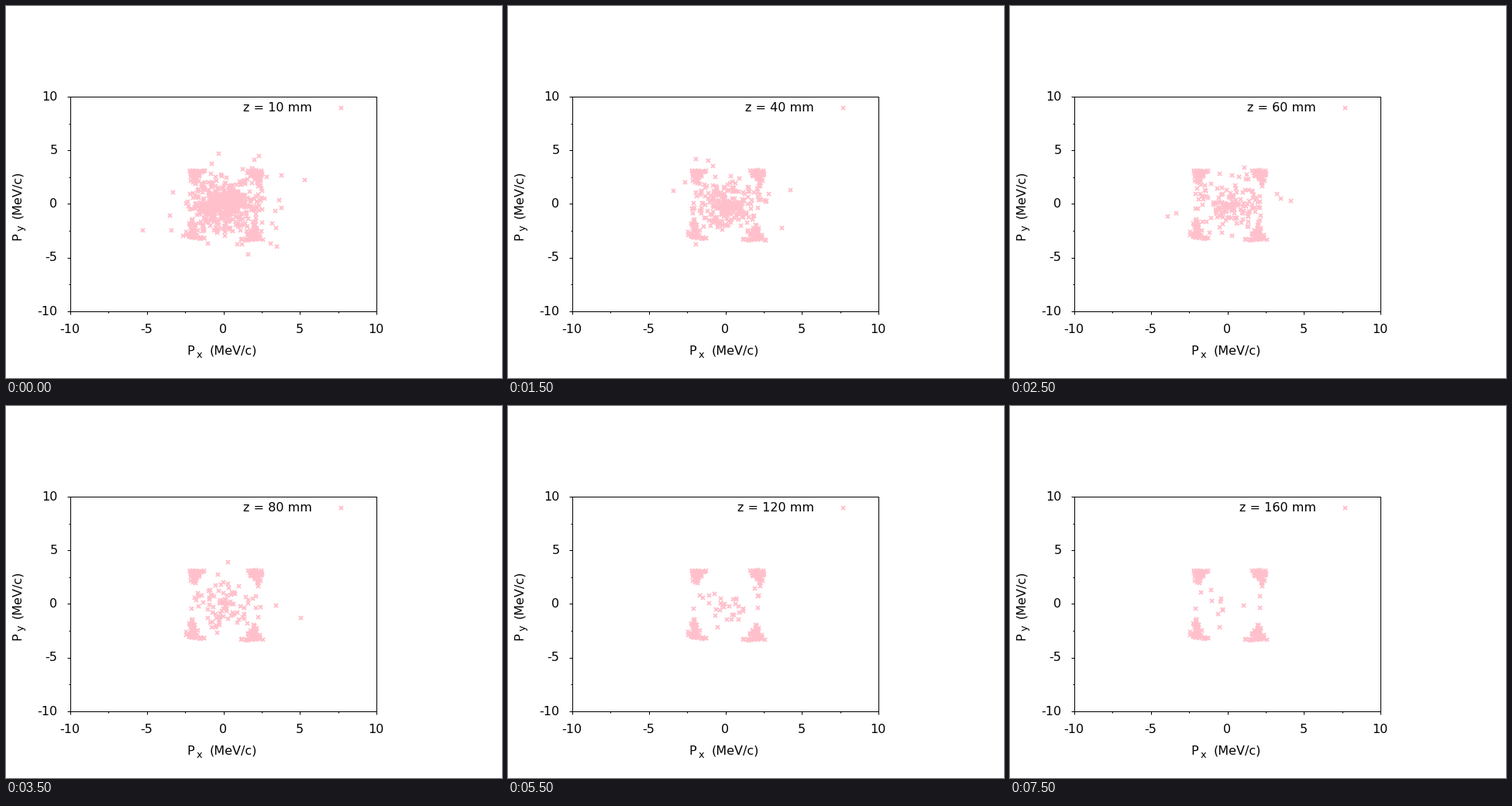
Animation, 640 px wide and 480 px high, one loop 8 s. Source, as a matplotlib script:

```python
import numpy as np
import matplotlib.pyplot as plt
from matplotlib.animation import FuncAnimation

W, H, DPI = 640, 480, 80
PX = 72 / DPI
PINK = "#ffc0cb"
L, R, T, B = 83, 478, 117, 394
CENTER = np.array([282, 256])

# Wedges of trapped particles: apex, middle of the base, half the base width
WEDGES = [
    ((240, 235), (245, 212), 13),
    ((325, 234), (320, 211), 15),
    ((239, 271), (242, 300), 15),
    ((320, 276), (318, 302), 17),
]
LINGERING = [(239, 261), (270, 285), (322, 245), (322, 260)]


def wedge(rng, apex, base, half, n=44):
    t = np.sqrt(rng.uniform(0, 1, (n, 1)))
    side = rng.triangular(-1, 0, 1, (n, 1)) * (half, 0)
    return apex + t * (np.subtract(base, apex) + side)


def ring(angle, radius, size):
    """Points around the centre on ellipses of the given half axes."""
    unit = np.column_stack([np.cos(angle), np.sin(angle)])
    return CENTER + unit * radius[:, None] * size


def cloud(z):
    """Moving particles still present at depth z, in mm."""
    rng = np.random.default_rng(z)
    n = round(580 * np.exp(-(z / 46) ** 1.15))
    wide = n // 8
    far = round(36 * np.exp(-z / 33))
    turn = rng.uniform(0, 2 * np.pi, n + far)
    core = ring(turn[:n - wide], rng.beta(1.5, 2, n - wide),
                (62 - 0.1 * z, 43 - 0.08 * z))
    edge = rng.uniform((238, 214), (330, 296), (wide, 2))
    strays = ring(turn[n:], 1 + rng.exponential(0.25, far), (64, 48))
    return np.vstack([core, edge, strays])


fig = plt.figure(figsize=(W / DPI, H / DPI), dpi=DPI, facecolor="white")
ax = fig.add_axes([0, 0, 1, 1])
ax.set(xlim=(0, W), ylim=(H, 0))
ax.axis("off")


def line(xs, ys):
    ax.plot(np.array(xs) + 0.5, np.array(ys) + 0.5, color="black", lw=PX,
            solid_capstyle="butt", solid_joinstyle="miter", snap=False)


def label(x, y, s, size=16, **kw):
    return ax.text(x, y, s, fontsize=size * PX, family="DejaVu Sans",
                   color="black", va="baseline", **kw)


def crosses(xs, ys):
    return ax.plot(xs, ys, ls="none", marker="x", color=PINK,
                   ms=5 * PX, mew=2 * PX)[0]


line([L, R, R, L, L, R], [T, T, B, B, T, T])
for i in range(9):
    x, y = L + (R - L) * i / 8, B - (B - T) * i / 8
    size = 2 if i % 2 else 4
    col, row = int(x + 0.5), int(np.ceil(y - 0.5))
    line([col, col], [B, B + size])
    line([L - size, L], [row, row])
    if i % 2 == 0:
        value = str(-10 + i * 5 // 2)
        label(x - 0.5, 422, value, ha="center")
        label(66.5, int(y) + 5, value, ha="right")

# Axis titles: offset along the text, unit text, size, drop below the baseline
for axis, place in (("x", lambda d, drop: (233.4 + d, 450 + drop)),
                    ("y", lambda d, drop: (19 + drop, 302.5 - d))):
    angle = 90 if axis == "y" else 0
    for d, s, size, drop in ((0, "P", 16, 0), (12.6, axis, 12.8, 4),
                             (29, "(MeV/c)", 16, 0)):
        label(*place(d, drop), s, size, rotation=angle, rotation_mode="anchor")

crosses([432], [131])
key = label(394.5, 136, "", ha="right")
dots = crosses([], [])
corner_rng = np.random.default_rng(4)
trapped = np.vstack([LINGERING] + [wedge(corner_rng, *w) for w in WEDGES])


def update(i):
    z = 10 * (i + 1)
    dots.set_data(*np.round(np.vstack([trapped, cloud(z)])).T)
    key.set_text(f"z = {z} mm")
    return dots, key


anim = FuncAnimation(fig, update, frames=16, interval=500, repeat=True,
                     repeat_delay=0, blit=False)
plt.show()
```
